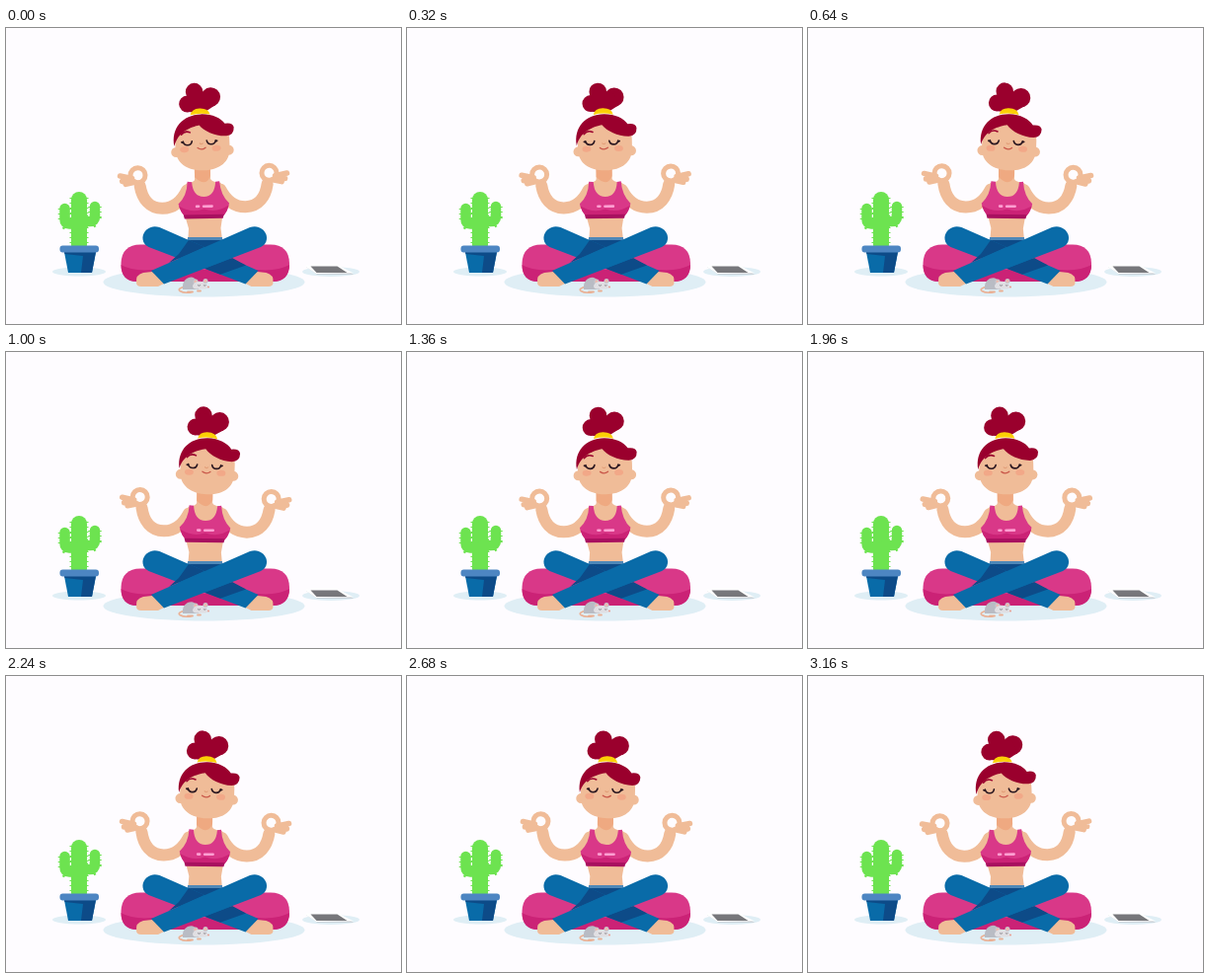
Write an HTML page that moves like this. It is 400 px wide and 300 px high and loops after 3.2 s.

```html
<!DOCTYPE html>
<html lang="en">
<head>
<meta charset="utf-8">
<title>Meditation</title>
<style>
  html, body { margin: 0; width: 100%; height: 100%; overflow: hidden; background: #fefcff; }
  svg { display: block; width: 100vw; height: 100vh; }
  .skin { fill: #f0bc98; }
  .arm { fill: none; stroke: #f0bc98; stroke-linecap: round; stroke-linejoin: round; }
  .hair { fill: #9a002d; }
  .pink { fill: #d93888; }
  .deep { fill: #cb2276; }
  .blue { fill: #096ba8; }
  .navy { fill: #0d4b88; }
  .shade { fill: #dfeef5; }
  .line { fill: none; stroke: #2b1720; stroke-width: 1.6; stroke-linecap: round; }
</style>
</head>
<body>
<svg viewBox="0 0 400 300" preserveAspectRatio="xMidYMid meet">
  <defs>
    <g id="leg">
      <path class="skin" d="M148 247L139 248Q131 250 132 258Q132 262 137 262H154L162 258Z"/>
      <path class="blue" d="M247 202C261 197 271 215 258 222L160 259.500L147 246Z"/>
    </g>
    <g id="arm" class="arm">
      <path stroke-width="12" d="M185 164C179 176 170 182 160 182C147 182 139.500 172 137.500 159"/>
      <circle cx="135.500" cy="148" r="7.500" stroke-width="5"/>
      <path stroke-width="5.500" d="M129.500 151L117.500 148.500M129.500 153L119.500 154M132 155L123 157"/>
    </g>
    <g id="cactusArms">
      <path d="M59.500 183V194Q59.500 198.500 64 198.500H72M90 181V191Q90 196 85 196H76"/>
    </g>
  </defs>

  <ellipse class="shade" cx="200.500" cy="257.500" rx="102" ry="15"/>
  <ellipse class="shade" cx="74" cy="247" rx="27" ry="4.500"/>
  <ellipse class="shade" cx="329" cy="247" rx="29" ry="5"/>

  <g id="cactus" fill="none" stroke="#6de350">
    <g stroke-dasharray="1 4">
      <path stroke-width="19" d="M74 172V220"/>
      <use href="#cactusArms" stroke-width="13.500"/>
    </g>
    <g stroke-linecap="round" stroke-linejoin="round">
      <path stroke-width="16" d="M74 174V220"/>
      <use href="#cactusArms" stroke-width="10.500"/>
    </g>
  </g>
  <g id="pot">
    <path class="blue" d="M59 227H91L87 248H63Z"/>
    <path class="navy" d="M59 227H91L87 248H76L78 231L59.500 229Z"/>
    <rect x="54.500" y="220.500" width="39.500" height="7" rx="3" fill="#4d86c2"/>
  </g>

  <g id="phone">
    <path fill="#b9bec4" d="M304 242L336 242L352 249.500H315Z"/>
    <path fill="#fff" d="M303 241.500Q304 240.500 306 240.500H336L352 248.500L314 249Z"/>
    <path fill="#77777b" d="M308.500 241.500H335.500L345.500 248H314.500Z"/>
  </g>

  <path class="pink" d="M116.500 239C116.500 226 124 219.500 136 219.500H268C280 219.500 287 226 287 239C287 251 281 257 270 257H133C122 257 116.500 251 116.500 239Z"/>
  <path class="deep" d="M116.500 240Q128 247 150 245H253Q275 247 287 240C287 251 281 257 270 257H133C122 257 116.500 251 116.500 240Z"/>

  <g id="torso">
    <g transform="translate(-.8 0)">
      <path class="skin" d="M182 188H221L218.500 203L220 217H185L186 203Z"/>
      <use href="#arm"/>
      <use href="#arm" transform="translate(404) scale(-1 1)"/>
      <path class="skin" d="M193 138H209V153Q210 156 219 157L225 165L221 190H182L178 165L185 157Q193 156 193 153Z"/>
      <path fill="#efa981" d="M193 143H209V150Q204 162 193 151Z"/>
      <path class="pink" d="M185.500 155.500L190 156Q191 171 202 171Q213 171 214 156L218 155.500Q219 170 227.500 178Q226 186 222 190H182Q178 186 176 178Q185 170 185.500 155.500Z"/>
      <path class="deep" d="M176.500 180Q189 188 202 183.500Q215 188 227 180Q225.500 186 222 190H182Q178 186 176.500 180Z"/>
      <path fill="#a8105f" d="M181 189H222L221 193H182Z"/>
      <path fill="none" stroke="#ff9fd2" stroke-width="2.600" stroke-linecap="round" d="M194.500 180.700H196.500M201.500 180.700H210"/>

      <g id="head">
        <g transform="translate(0 .8)">
          <circle class="skin" cx="175.500" cy="124" r="5"/>
          <circle class="skin" cx="229" cy="124" r="5"/>
          <path class="skin" d="M175 112C175 83 230 83 230 112V121C230 136 219 143.500 203 143.500C187 143.500 175 136 175 121Z"/>
          <g class="hair">
            <circle cx="189" cy="75.500" r="8.500"/>
            <circle cx="196.500" cy="63.500" r="8.800"/>
            <circle cx="213" cy="69.500" r="9.700"/>
            <path d="M183.500 82L194 60L213 66L217 78L207 84H192Z"/>
            <path d="M174 118C171 99 184 86.500 202 86.500C213 86.500 222 91 226 97Q234 96 235 101Q235 109 227 109.500C216 109.500 205 104 200 97.500C192 99 178 103 174 118Z"/>
          </g>
          <path fill="#fbd006" d="M191.500 87Q193 80.500 201 80.500Q210 80.500 211.500 87Q201 84.500 191.500 87Z"/>
          <path fill="none" stroke="#9a002d" stroke-width="1.500" stroke-linecap="round" d="M181.500 106.500Q185 102 190.500 104.500"/>
          <path class="line" d="M183 113.500C184 118.500 191 118.500 192 113.500M207 113.500C208 118.500 215 118.500 216 113.500M183.500 115L181.500 114M215.500 115L217.500 114"/>
          <g fill="#f49b7e" opacity=".6">
            <ellipse cx="184" cy="121.500" rx="4.500" ry="3"/>
            <ellipse cx="216.500" cy="121.500" rx="4.500" ry="3"/>
          </g>
          <path fill="none" stroke="#e2a07b" stroke-width="1.200" stroke-linecap="round" d="M200 116Q201.500 117.500 203 116"/>
          <path fill="none" stroke="#c9584a" stroke-width="1.300" stroke-linecap="round" d="M197.500 120.500Q201.500 123.500 205.500 120.500"/>
        </g>
      </g>
    </g>
  </g>

  <path class="navy" d="M184 213H219L222 232H181Z"/>
  <rect x="184" y="212" width="35" height="3" fill="#4f88b8"/>
  <use href="#leg" transform="translate(402.500) scale(-1 1)"/>
  <path class="navy" d="M185 215L201 222L165 238L175 229Z"/>
  <path class="navy" d="M201 243.800L229 233L243 240.500L217 249.800Z"/>
  <use href="#leg"/>

  <g id="mouse">
    <path fill="none" stroke="#eab094" stroke-width="1.600" stroke-linecap="round" d="M182 262Q173 264 176 266.500Q180 269 187 268"/>
    <path id="mouseBody" fill="#b9bcc4" d="M179 265C178 258 182 253 188 253C193 254 197 260 195 265Z"/>
    <circle cx="192" cy="257" r="2.600" fill="#c6c6cd"/>
    <circle cx="192" cy="257" r="1.500" fill="#efb9ad"/>
    <path fill="#e0dfe3" d="M189 261.500C190 256 199 255 203 259.500Q207 263.500 202 264.500H193Q189 264.500 189 261.500Z"/>
    <circle cx="202" cy="256.500" r="2.500" fill="#c6c6cd"/>
    <circle cx="202" cy="256.500" r="1.400" fill="#efb9ad"/>
    <circle cx="205" cy="262.500" r="1" fill="#e99b8d"/>
    <path fill="none" stroke="#6b666e" stroke-width=".7" d="M194 260.500Q195.500 262 197 260.500M200 260.500Q201 262 202.500 260.500"/>
    <path fill="none" stroke="#eab094" stroke-width="1.800" stroke-linecap="round" d="M184 267.500H189M194 266.500H197"/>
  </g>
</svg>
<script>
  const SWAY_MS = 1600;
  const LAG = 0.03;
  const torso = document.getElementById('torso');
  const head = document.getElementById('head');
  const mouseBody = document.getElementById('mouseBody');
  const start = performance.now();

  function rotate(el, degrees, x, y) {
    el.setAttribute('transform', `rotate(${degrees} ${x} ${y})`);
  }

  function render(ms) {
    const sway = -Math.cos(2 * Math.PI * (ms / SWAY_MS - LAG));
    rotate(torso, 1.05 * sway, 202, 215);
    rotate(head, 1.45 * sway, 202, 160);
    const breath = 1 - 0.03 * sway;
    mouseBody.setAttribute('transform', `translate(0 ${266 * (1 - breath)}) scale(1 ${breath})`);
  }

  function tick() {
    render(performance.now() - start);
    requestAnimationFrame(tick);
  }
  render(0);
  requestAnimationFrame(tick);
</script>
</body>
</html>
```
